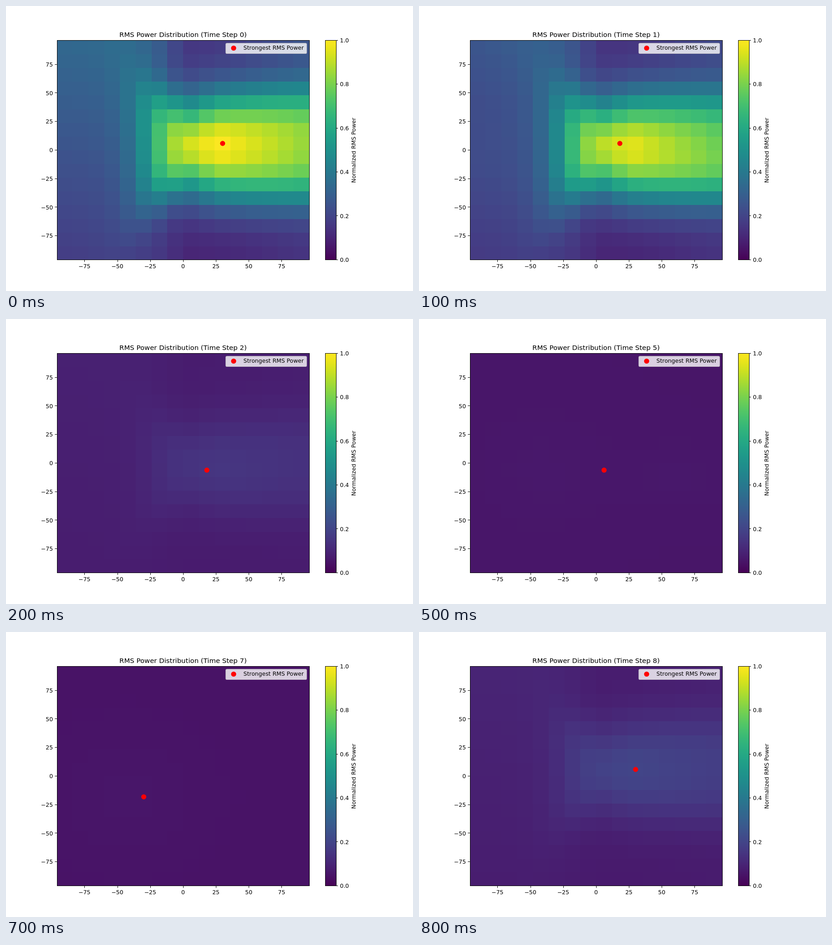
An HTML page with a canvas that plays this animation: 894x626 px, repeating every 0.9 s.

```html
<!DOCTYPE html>
<html lang="en">
<head>
<meta charset="utf-8">
<title>RMS Power Distribution</title>
<style>
  html, body { margin: 0; width: 100%; height: 100%; overflow: hidden; background: #fff; }
  canvas { display: block; }
</style>
</head>
<body>
<canvas id="stage" width="894" height="626"></canvas>
<script>
const ctx = document.getElementById('stage').getContext('2d');
const W = 894, H = 626, N = 16, STEP_MS = 100, STEPS = 9;
const plot = { x: 111.75, y: 75.9, w: 554.28, h: 482 };
const bar = { x: 700.67, y: 75.9, w: 24.1, h: 482 };
const FONT = '"DejaVu Sans", sans-serif', SMALL = 12.417, LARGE = 14.9;

// Strongest point of each step, in data units.
const peaks = [[30, 6], [18, 6], [18, -6], [42, -6], [30, -6], [6, -6], [-18, -18], [-30, -18], [30, 6]];

const clamp = (v, lo, hi) => Math.min(hi, Math.max(lo, v));
const mix = (a, b, t) => a + (b - a) * t;
const bump = (c, r, cx, cy, sx, sy) => Math.exp(-(((c - cx) / sx) ** 2) - ((r - cy) / sy) ** 2);

// A sloping floor with a dip in the middle, and a ridge running to the right.
function base(c, r) {
  const left = Math.max(0, 8 - c), right = Math.max(0, c - 8);
  const dip = Math.exp(-(((c - 8.2) / (c < 8.2 ? 1.9 : 7.2)) ** 2));
  const floor = mix(0.33 - 0.18 * dip, 0.18 - 0.08 * dip, r / (N - 1));
  const height = 0.87 / (1 + Math.exp((5.8 - c) / 0.85)) - 0.045 * Math.max(0, c - 10);
  const width = 3.4 + 0.2 * left ** 2 + 0.8 * (1 - Math.exp(-right / 3));
  const sharpness = 2 + 0.5 * left + 0.13 * right;
  return floor + height * Math.exp(-((Math.abs(r - 7.2) / width) ** sharpness));
}

function faded(c, r) {
  const edge = Math.abs(c - 7.5) / 7.5;
  const top = clamp((9 - r) / 5, 0, 1);
  return base(c, r) * (0.98 - top * (0.04 + 0.1 * edge) - edge * (c < 8 ? 0.05 : 0));
}

const quietEast = (c, r) => 0.063 + 0.014 * bump(c, r, 13, 8.5, 4, 2.5) + 0.007 * bump(c, r, 4, 7, 5, 4);
const quietWest = (c, r) => 0.05 + 0.008 * bump(c, r, 4, 9, 4, 4);

function value(step, c, r) {
  if (step === 0) return base(c, r);
  if (step === 1) return faded(c, r);
  if (step === 2) return 0.068 + 0.085 * base(c, r - 0.5) ** 1.3;
  if (step === 8) return 0.06 + 0.145 * base(c, r + 0.2) ** 1.2;
  return mix(quietEast(c, r), quietWest(c, r), (step - 3) / 4);
}

// Polynomial fit of the viridis colour map, lowest power first.
const viridis = [
  [0.2777, 0.1051, -0.3309, -4.6342, 6.2283, 4.7764, -5.4355],
  [0.0054, 1.4046, 0.2148, -5.7991, 14.1799, -13.7451, 4.6459],
  [0.3341, 1.3846, 0.0951, -19.3324, 56.6906, -65.353, 26.3124]
];

function color(v) {
  const t = clamp(v, 0, 1);
  const channel = p => Math.round(255 * clamp(p.reduceRight((sum, k) => sum * t + k, 0), 0, 1));
  return `rgb(${viridis.map(channel)})`;
}

// Pixel snapping, with y counted from the bottom edge.
const snapX = x => Math.floor(x + 0.5) + 0.5;
const snapY = y => H - Math.floor(H - y + 0.5) - 0.5;
const dataX = v => plot.x + (v + 96) / 192 * plot.w;
const dataY = v => plot.y + (96 - v) / 192 * plot.h;

function line(x1, y1, x2, y2) {
  ctx.beginPath();
  ctx.moveTo(x1, y1);
  ctx.lineTo(x2, y2);
  ctx.stroke();
}

function frame(b) {
  const x = snapX(b.x), y = snapY(b.y);
  ctx.strokeRect(x, y, snapX(b.x + b.w) - x, snapY(b.y + b.h) - y);
}

function text(str, x, y, align, size = SMALL) {
  ctx.font = `${size}px ${FONT}`;
  ctx.textAlign = align;
  ctx.fillStyle = '#000';
  ctx.fillText(str, x, y);
}

function dot(x, y) {
  ctx.fillStyle = '#f00';
  ctx.beginPath();
  ctx.arc(x, y, 5.6, 0, Math.PI * 2);
  ctx.fill();
}

function drawCells(step) {
  const gx = i => Math.round(plot.x + plot.w * i / N);
  const gy = i => Math.round(plot.y + plot.h * i / N);
  for (let r = 0; r < N; r++) {
    for (let c = 0; c < N; c++) {
      ctx.fillStyle = color(value(step, c, r));
      ctx.fillRect(gx(c), gy(r), gx(c + 1) - gx(c), gy(r + 1) - gy(r));
    }
  }
}

function drawBar() {
  const top = Math.round(bar.y), bottom = Math.round(bar.y + bar.h);
  const left = Math.round(bar.x), right = Math.round(bar.x + bar.w);
  for (let y = top; y < bottom; y++) {
    ctx.fillStyle = color(1 - (y + 0.5 - top) / (bottom - top));
    ctx.fillRect(left, y, right - left, 1);
  }
}

function drawAxes() {
  const bottom = plot.y + plot.h, right = bar.x + bar.w;
  ctx.strokeStyle = '#000';
  ctx.lineWidth = 1;
  frame(plot);
  frame(bar);
  for (let v = -75; v <= 75; v += 25) {
    const label = String(v).replace('-', '\u2212');
    const x = snapX(dataX(v)), y = snapY(dataY(v));
    line(x, bottom, x, bottom + 4.35);
    line(plot.x, y, plot.x - 4.35, y);
    text(label, dataX(v), 576, 'center');
    text(label, 103.05, Math.round(dataY(v) + 4.2), 'right');
  }
  for (let i = 0; i <= 5; i++) {
    const y = bar.y + bar.h * (1 - i / 5);
    line(right, snapY(y), right + 4.35, snapY(y));
    text((i / 5).toFixed(1), 733.5, Math.round(y + 4.2), 'left');
  }
  ctx.save();
  ctx.translate(768, plot.y + plot.h / 2);
  ctx.rotate(-Math.PI / 2);
  text('Normalized RMS Power', 0, 0, 'center');
  ctx.restore();
}

function drawLegend() {
  ctx.beginPath();
  ctx.roundRect(482.8, 81.8, 177.6, 22.6, 2.5);
  ctx.fillStyle = 'rgba(255,255,255,0.8)';
  ctx.fill();
  ctx.strokeStyle = 'rgba(204,204,204,0.8)';
  ctx.lineWidth = 1.24;
  ctx.stroke();
  dot(500, 92.5);
  text('Strongest RMS Power', 521.6, 96, 'left');
}

function draw(step) {
  ctx.fillStyle = '#fff';
  ctx.fillRect(0, 0, W, H);
  drawCells(step);
  drawBar();
  const [px, py] = peaks[step];
  dot(dataX(px) + 0.3, dataY(py));
  drawAxes();
  text(`RMS Power Distribution (Time Step ${step})`, plot.x + plot.w / 2, 68, 'center', LARGE);
  drawLegend();
}

const start = performance.now();
function tick() {
  draw(Math.floor((performance.now() - start) / STEP_MS) % STEPS);
  requestAnimationFrame(tick);
}
tick();
</script>
</body>
</html>
```
